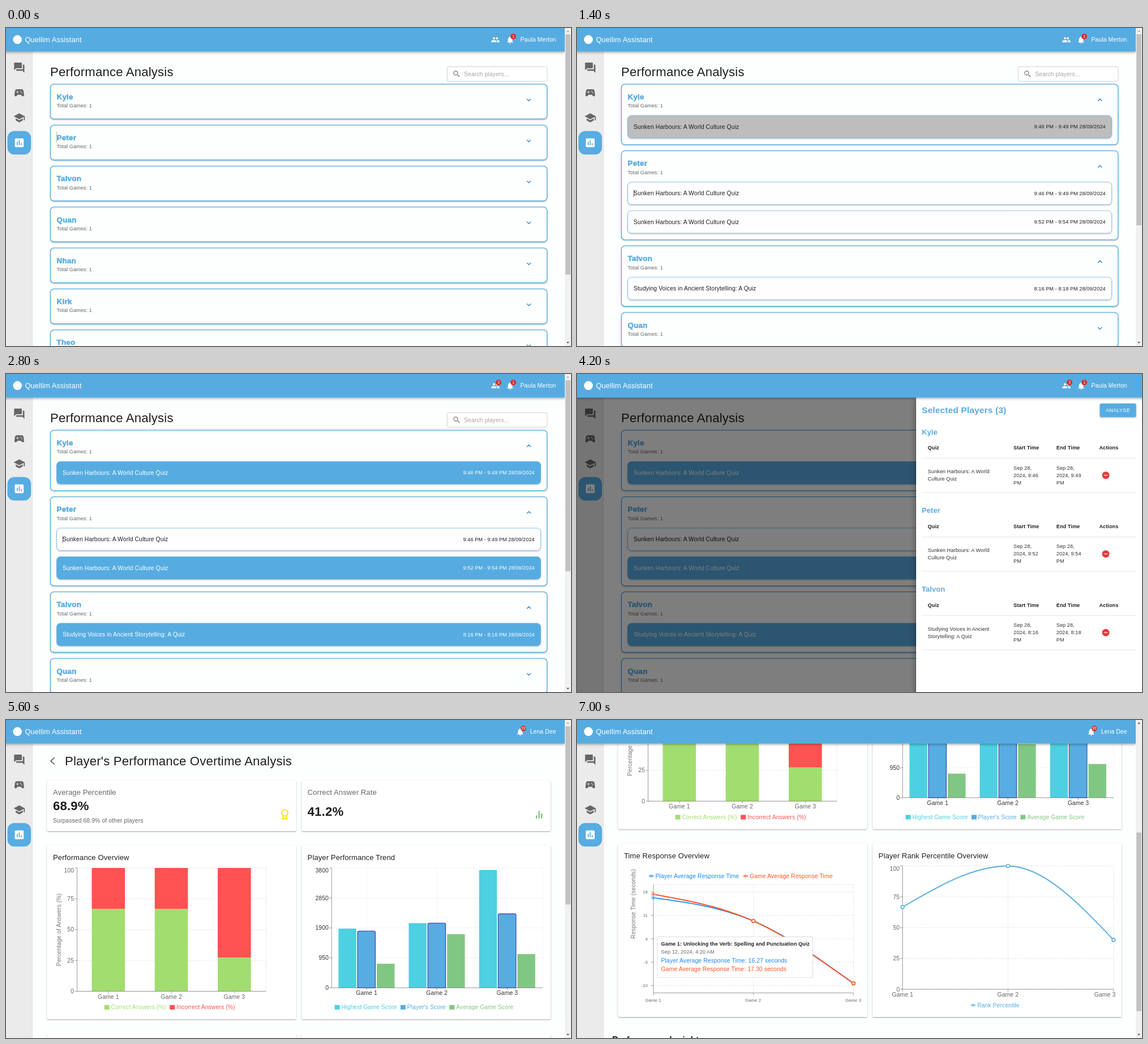
Recreate the animation shown at these times as an HTML page. Size 998 by 561 pixels, loop 8000 ms.

```html
<!DOCTYPE html>
<html lang="en">
<head>
<meta charset="utf-8">
<title>Performance Analysis</title>
<style>
  html, body { margin: 0; width: 100%; height: 100%; overflow: hidden; background: #fdfefe; }
  svg { display: block; width: 998px; height: 561px; }
  text { font-family: "Liberation Sans", Arial, sans-serif; letter-spacing: .009em; white-space: pre; }
</style>
</head>
<body>
<svg id="stage" viewBox="0 0 998 561" xmlns="http://www.w3.org/2000/svg">
  <defs>
    <filter id="bar" x="-5%" y="-20%" width="110%" height="160%"><feDropShadow dx="0" dy="1.6" stdDeviation="1.9" flood-opacity=".34"/></filter>
    <filter id="card" x="-2%" y="-10%" width="104%" height="125%"><feDropShadow dx="0" dy=".9" stdDeviation=".8" flood-opacity=".3"/></filter>
    <filter id="paper" x="-3%" y="-8%" width="106%" height="118%"><feDropShadow dx="0" dy="1" stdDeviation="1.3" flood-opacity=".38"/></filter>
    <filter id="side" x="-10%" y="-5%" width="120%" height="110%"><feDropShadow dx="-1" dy="3" stdDeviation="5" flood-opacity=".4"/></filter>
  </defs>
  <g id="view"></g>
</svg>
<script>
const BLUE = "#57ace1", INK = "#1f1f1f", GREY = "#666", LINK = "#1976d2";
const S = { xs: 7.8, sm: 9.1, md: 10.4, lg: 13, xl: 15.6, h: 22.1 };

const ICON = {
  forum: "M21 6h-2v9H6v2c0 .55.45 1 1 1h11l4 4V7c0-.55-.45-1-1-1zm-4 6V3c0-.55-.45-1-1-1H3c-.55 0-1 .45-1 1v14l4-4h10c.55 0 1-.45 1-1z",
  pad: "M21.58 16.09l-1.09-7.66C20.21 6.46 18.52 5 16.53 5H7.47C5.48 5 3.79 6.46 3.51 8.43l-1.09 7.66C2.2 17.63 3.39 19 4.94 19c.68 0 1.32-.27 1.8-.75L9 16h6l2.25 2.25c.48.48 1.13.75 1.8.75 1.56 0 2.75-1.37 2.53-2.91zM11 11H9v2H8v-2H6v-1h2V8h1v2h2v1zm4-1a1 1 0 1 1 0-2 1 1 0 0 1 0 2zm2 3a1 1 0 1 1 0-2 1 1 0 0 1 0 2z",
  school: "M5 13.18v4L12 21l7-3.82v-4L12 17l-7-3.82zM12 3L1 9l11 6 9-4.91V17h2V9L12 3z",
  chart: "M19 3H5c-1.1 0-2 .9-2 2v14c0 1.1.9 2 2 2h14c1.1 0 2-.9 2-2V5c0-1.1-.9-2-2-2zM9 17H7v-7h2v7zm4 0h-2V7h2v10zm4 0h-2v-4h2v4z",
  people: "M16 11a3 3 0 1 0 0-6 3 3 0 0 0 0 6zm-8 0a3 3 0 1 0 0-6 3 3 0 0 0 0 6zm0 2c-2.33 0-7 1.17-7 3.5V19h14v-2.5c0-2.33-4.67-3.5-7-3.5zm8 0c-.29 0-.62.02-.97.05 1.16.84 1.97 1.97 1.97 3.45V19h6v-2.5c0-2.33-4.67-3.5-7-3.5z",
  bell: "M12 22c1.1 0 2-.9 2-2h-4c0 1.1.89 2 2 2zm6-6v-5c0-3.07-1.64-5.64-4.5-6.32V4a1.5 1.5 0 0 0-3 0v.68C7.63 5.36 6 7.92 6 11v5l-2 2v1h16v-1l-2-2z",
  search: "M15.5 14h-.79l-.28-.27A6.5 6.5 0 1 0 13.73 14.43l.27.28v.79l5 4.99L20.49 19l-4.99-5zm-6 0a4.5 4.5 0 1 1 0-9 4.5 4.5 0 0 1 0 9z",
  more: "M16.59 8.59 12 13.17 7.41 8.59 6 10l6 6 6-6z",
  less: "m12 8-6 6 1.41 1.41L12 10.83l4.59 4.58L18 14z",
  remove: "M12 2a10 10 0 1 0 0 20 10 10 0 0 0 0-20zm5 11H7v-2h10v2z"
};

// Drawing helpers
const text = (x, y, s, size, fill = INK, more = "") =>
  `<text x="${x}" y="${y}" font-size="${size}" fill="${fill}" ${more}>${s}</text>`;
const MID = 'text-anchor="middle"', END = 'text-anchor="end"', BOLD = 'font-weight="700"';
const rect = (x, y, w, h, fill, more = "") =>
  `<rect x="${x}" y="${y}" width="${w}" height="${h}" fill="${fill}" ${more}/>`;
const line = (x1, y1, x2, y2, stroke, more = "") =>
  `<path d="M${x1} ${y1}L${x2} ${y2}" stroke="${stroke}" stroke-width=".65" fill="none" ${more}/>`;
const dash = (x1, y1, x2, y2, c = "#ccc") => line(x1, y1, x2, y2, c, 'stroke-dasharray="1.95 1.95"');
const circle = (x, y, r, fill, more = "") => `<circle cx="${x}" cy="${y}" r="${r}" fill="${fill}" ${more}/>`;
const place = (x, y, k, body, more = "") =>
  `<g transform="translate(${x} ${y}) scale(${k}) translate(-12 -12)" ${more}>${body}</g>`;
const icon = (name, x, y, fill, k = .65) => place(x, y, k, `<path d="${ICON[name]}" fill="${fill}"/>`);
const shift = (dy, body) => `<g transform="translate(0 ${dy})">${body}</g>`;
const vertical = (x, y, s) => text(0, 0, s, S.md, "#777", `${MID} transform="translate(${x} ${y}) rotate(-90)"`);

// Shared frame of the app
function badge(x, n) {
  return circle(x, 15, 5, "#d32f2f") + text(x, 17.3, n, 6.6, "#fff", MID);
}

function header(user, bellX, bellCount, people, width = 987) {
  let s = rect(-6, -10, width + 6, 51.6, BLUE, 'filter="url(#bar)"')
    + circle(20.2, 20.4, 7.8, "#fff")
    + text(33.5, 25.3, "Quellim Assistant", 12.8, "#fff")
    + icon("bell", bellX, 21, "#fff") + badge(bellX + 5.5, bellCount)
    + text(971.5, 24.4, user, S.md, "#fff", END);
  if (people != null) s += icon("people", 864.5, 20.7, "#fff");
  if (people) s += badge(870, people);
  return s;
}

function sidebar() {
  return rect(0, 41, 46.3, 520, "#ebebeb") + line(46.5, 41, 46.5, 561, "#d2d2d2")
    + icon("forum", 23.4, 70, GREY, .91) + icon("pad", 23.4, 114.3, GREY, .89)
    + icon("school", 23.4, 158.4, GREY, .89)
    + rect(2.6, 181.7, 41.5, 41.5, BLUE, 'rx="12"') + icon("chart", 23.4, 202.5, "#fff", .87);
}

function scrollbar(top, bottom) {
  const atTop = top < 12;
  return rect(987, 0, 11, 561, "#f1f1f1") + rect(988.2, top, 8.7, bottom - top, "#c1c1c1")
    + `<path d="M990 6.8h5l-2.5-2.8z" fill="${atTop ? "#a3a3a3" : "#505050"}"/>`
    + '<path d="M990 553.8h5l-2.5 2.8z" fill="#505050"/>';
}

// Player list
const HARBOURS = "Sunken Harbours: A World Culture Quiz";
const VOICES = "Studying Voices in Ancient Storytelling: A Quiz";
const players = [
  ["Kyle", [[HARBOURS, "9:46 PM - 9:49 PM"]]],
  ["Peter", [[HARBOURS, "9:46 PM - 9:49 PM"], [HARBOURS, "9:52 PM - 9:54 PM"]]],
  ["Talvon", [[VOICES, "8:16 PM - 8:18 PM"]]],
  ["Quan"], ["Nhan"], ["Kirk"], ["Theo"]
];
const itemFill = { plain: "#fefefe", hover: "#bdbdbd", picked: BLUE };

function quizRow(y, [title, time], state) {
  const ink = state === "picked" ? "#fff" : INK;
  return rect(89.6, y, 854.8, 39.6, itemFill[state], `rx="6.5" stroke="${BLUE}" stroke-width=".65" filter="url(#card)"`)
    + text(100, y + 23.3, title, S.md, ink)
    + text(933.7, y + 22.8, time + " 28/09/2024", S.sm, ink, END);
}

function playerList(states) {
  let y = 99.1, row = 0;
  let s = text(78, 84.6, "Performance Analysis", S.h)
    + rect(779.3, 68.2, 176.6, 25.8, "#fff", 'rx="2.6" stroke="#c4c4c4" stroke-width=".8"')
    + icon("search", 796, 81, "#757575") + text(809, 84.7, "Search players...", S.md, "#a6a6a6");
  for (const [name, games = []] of players) {
    const open = states && games.length > 0;
    const h = open ? 56.2 + 50.4 * games.length : 61.4;
    s += rect(78.5, y, 877.2, h, "#fdfefe", `rx="6.2" stroke="${BLUE}" stroke-width="1.3" filter="url(#card)"`)
      + text(89.5, y + 26.7, name, 13.3, BLUE, `${BOLD} stroke="${BLUE}" stroke-width=".5" style="letter-spacing:.3px"`)
      + text(89.5, y + 41.1, "Total Games: 1", S.sm, GREY)
      + icon(open ? "less" : "more", 923.6, y + 27.8, LINK);
    if (open) games.forEach((g, i) => { s += quizRow(y + 55.4 + 50.4 * i, g, states[row++]); });
    y += h + 10.85;
  }
  return s;
}

const picked = ["picked", "plain", "picked", "picked"];
const listPage = (states, end, people, caret) => sidebar() + playerList(states) + caret
  + header("Paula Merton", 890.5, 1, people) + scrollbar(11, end);

// Selection drawer
function drawer() {
  const cols = [619.6, 771, 846.8, 922.4];
  const picks = [
    ["Kyle", ["Sunken Harbours: A World", "Culture Quiz"], "9:46", "9:49"],
    ["Peter", ["Sunken Harbours: A World", "Culture Quiz"], "9:52", "9:54"],
    ["Talvon", ["Studying Voices in Ancient", "Storytelling: A Quiz"], "8:16", "8:18"]
  ];
  const lines = (x, y, rows) => rows.map((r, i) => text(x, y + 13 * i, r, S.sm, "#333")).join("");
  const date = t => ["Sep 28,", `2024, ${t}`, "PM"];
  let s = rect(599, 41, 410, 530, "#fff", 'filter="url(#side)"')
    + text(609, 69.2, "Selected Players (3)", 15.5, BLUE, BOLD)
    + rect(923.5, 52, 64, 23.8, BLUE, 'rx="2.6" filter="url(#paper)"')
    + text(955.5, 67.1, "ANALYSE", S.sm, "#fff", `${MID} style="letter-spacing:.026em"`);
  picks.forEach(([name, quiz, from, to], i) => {
    const y = 138.75 * i;
    s += text(609, y + 106.5, name, 12.9, BLUE, BOLD);
    ["Quiz", "Start Time", "End Time", "Actions"].forEach((c, j) => {
      s += text(cols[j], y + 133.3, c, S.sm, INK, BOLD);
    });
    s += line(609, y + 148.6, 988, y + 148.6, "#dcdcdc") + line(609, y + 209.2, 988, y + 209.2, "#dcdcdc")
      + lines(cols[0], y + 175, quiz) + lines(cols[1], y + 168.6, date(from)) + lines(cols[2], y + 168.6, date(to))
      + icon("remove", 934, y + 178.7, "#e8383d");
  });
  return s;
}

const drawerPage = () => sidebar() + playerList(picked) + rect(0, 41, 998, 520, "#000", 'opacity=".5"')
  + drawer() + header("Paula Merton", 890.5, 1, 3, 1010);

// Charts
const paper = (x, y, h) => rect(x, y, 439.8, h, "#fff", 'rx="2.6" filter="url(#paper)"');

// Axes with tick labels; the topmost label may be nudged down.
function axes(x0, x1, y0, y1, ticks, xs, o) {
  let s = "";
  for (const [y] of ticks) s += dash(x0, y, x1, y, o.grid);
  for (const x of [...xs, x1]) s += dash(x, y0, x, y1, o.grid);
  if (o.top) s += dash(x0, y0, x1, y0, o.grid);
  s += o.marks || "";
  s += line(x0, y0, x0, y1, GREY) + line(x0, y1, x1, y1, GREY);
  ticks.forEach(([y, label], i) => {
    const nudge = i === 0 ? o.nudge || 0 : 0;
    s += line(x0 - 4, y, x0, y, GREY) + text(x0 - o.gap, y + o.size * .35 + nudge, label, o.size, o.ink, END);
  });
  (o.names || xs).forEach((x, i) => {
    s += line(xs[i] ?? x1, y1, xs[i] ?? x1, y1 + 4, GREY)
      + text(x, y1 + o.drop, `Game ${i + 1}`, o.size, o.ink, MID);
  });
  return s;
}

const scale = (top, bottom, labels) => labels.map((l, i) => [top + (bottom - top) * i / (labels.length - 1), l]);
const key = (x, s, c) => rect(x, 502.8, 9, 8, c) + text(x + 11.8, 510.2, s, S.md, c);
const lineKey = (x, y, s, c) => `<path d="M${x} ${y}h9" stroke="${c}" stroke-width="1.3"/>`
  + circle(x + 4.5, y, 1.7, "#fff", `stroke="${c}" stroke-width="1.2"`) + text(x + 11.7, y + 3.7, s, S.md, c);

function answerChart() {
  const base = 478.6, xs = [180.8, 292, 403.3];
  const marks = [66.7, 66.7, 27.3].map((p, i) => {
    const top = base - 2.176 * p, x = xs[i] - 29.3;
    return rect(x, 261, 58.6, top - 261, "#ff5252") + rect(x, top, 58.6, base - top, "#a2dd70");
  }).join("");
  return axes(125.5, 459.2, 261, base, scale(261, base, [100, 75, 50, 25, 0]), xs,
    { marks, size: S.md, ink: GREY, gap: 5.4, drop: 12.9, nudge: 4.6 })
    + vertical(97, 370, "Percentage of Answers (%)")
    + key(173.6, "Correct Answers (%)", "#a2dd70") + key(289.2, "Incorrect Answers (%)", "#ff5252");
}

function scoreChart() {
  const base = 472.5, xs = [637, 761.1, 885.4];
  const tops = [[368, 372.3, 430], [358.4, 358.3, 377.8], [264.6, 342, 413]];
  const marks = tops.map(([a, b, c], i) => {
    const x = xs[i];
    return rect(x - 49.7, a, 31.4, base - a, "#4dd0e1")
      + `<path d="M${x - 16} ${base}V${b + 2.6}q0-2.6 2.6-2.6h26.2q2.6 0 2.6 2.6V${base}z" fill="${BLUE}" stroke="#3f51b5" stroke-width="1.3"/>`
      + rect(x + 18, c, 31.4, base - c, "#81c784");
  }).join("");
  return axes(575.2, 948, 261, base, scale(261, base, [3800, 2850, 1900, 950, 0]), xs,
    { marks, size: S.md, ink: "#333", gap: 5.2, drop: 12.9, nudge: 4.4, grid: "#dedede" })
    + key(580.5, "Highest Game Score", "#4dd0e1") + key(696.8, "Player's Score", BLUE)
    + key(783.2, "Average Game Score", "#81c784");
}

// Monotone cubic through three points
function curve([[x0, y0], [x1, y1], [x2, y2]], c) {
  const h0 = x1 - x0, h1 = x2 - x1, a = (y1 - y0) / h0, b = (y2 - y1) / h1;
  const p = (a * h1 + b * h0) / (h0 + h1);
  const m = (Math.sign(a) + Math.sign(b)) * Math.min(Math.abs(a), Math.abs(b), Math.abs(p) / 2);
  const m0 = (3 * a - m) / 2, m2 = (3 * b - m) / 2;
  const d = `M${x0} ${y0}C${x0 + h0 / 3} ${y0 + m0 * h0 / 3} ${x1 - h0 / 3} ${y1 - m * h0 / 3} ${x1} ${y1}`
    + `C${x1 + h1 / 3} ${y1 + m * h1 / 3} ${x2 - h1 / 3} ${y2 - m2 * h1 / 3} ${x2} ${y2}`;
  return `<path d="${d}" fill="none" stroke="${c}" stroke-width="1.9"/>`;
}
const dots = (pts, c) => pts.map(([x, y]) => circle(x, y, 2.9, "#fff", `stroke="${c}" stroke-width="1.5"`)).join("");
const activeDot = (y, c) => circle(135, y, 2.6, c, 'stroke="#fff" stroke-width="1.1"');

function responseChart() {
  const mine = "#1e88f0", all = "#ff5722";
  const rest = [[311.6, 354.6], [488.3, 464.6]];
  const a = [[135, 313.6], ...rest], b = [[135, 307.5], ...rest];
  return axes(135, 488.3, 290.6, 481.4, scale(303.5, 468.5, [18, 11, 4, -3, -10]), [311.6],
    { size: S.xs, ink: GREY, gap: 10, drop: 15.6, top: true, names: [] })
    + [135, 311.6, 488.3].map((x, i) => line(x, 481.4, x, 485.4, GREY)
      + text(x - .5, 497, `Game ${i + 1}`, S.xs, GREY, MID)).join("")
    + vertical(103.4, 324.5, "Response Time (seconds)")
    + lineKey(126.8, 275.3, "Player Average Response Time", mine)
    + lineKey(293.2, 275.3, "Game Average Response Time", all)
    + curve(a, mine) + curve(b, all) + dots(a, mine) + dots(b, all)
    + activeDot(313.6, mine) + activeDot(307.5, all)
    + rect(142, 382.5, 274.3, 71.6, "#fff", 'stroke="#ccc" stroke-width=".65"')
    + text(148.6, 398.3, "Game 1: Unlocking the Verb: Spelling and Punctuation Quiz", S.sm, INK, BOLD)
    + text(148.6, 412.2, "Sep 12, 2024, 4:20 AM", S.sm, GREY)
    + text(148.6, 427.6, "Player Average Response Time: 16.27 seconds", S.md, mine)
    + text(148.6, 443.3, "Game Average Response Time: 17.30 seconds", S.md, all);
}

function rankChart() {
  const pts = [[575, 330], [761.3, 257.5], [947.8, 388]];
  return axes(575, 947.8, 257.5, 475, scale(257.5, 475, [100, 75, 50, 25, 0]), [575, 761.3],
    { size: S.md, ink: GREY, gap: 5, drop: 12.9, nudge: 4.6, names: [575, 761.3, 932.5] })
    + curve(pts, BLUE) + dots(pts, BLUE) + lineKey(695.2, 503.1, "Rank Percentile", BLUE);
}

const strokeIcon = (x, c, d) => place(x, 167, .78, `<path d="${d}"/>`,
  `fill="none" stroke="${c}" stroke-width="2" stroke-linecap="round" stroke-linejoin="round"`);

function summary() {
  return '<path d="M85.6 66.3L79 72.2L85.6 78.2" fill="none" stroke="#444" stroke-width="1.4"/>'
    + text(104, 79.6, "Player's Performance Overtime Analysis", S.h)
    + paper(72.6, 106.6, 89.4) + paper(522.2, 106.6, 89.4)
    + text(83, 131.9, "Average Percentile", S.lg, GREY)
    + text(83, 158.6, "68.9%", S.h, INK, BOLD)
    + text(83, 181.4, "Surpassed 68.9% of other players", S.md, GREY)
    + strokeIcon(492.4, "#ffd600", "M12 1a7 7 0 1 0 0 14 7 7 0 0 0 0-14zM8.21 13.89L7 23l5-3 5 3-1.21-9.12")
    + text(532.6, 131.9, "Correct Answer Rate", S.lg, GREY)
    + text(532.6, 169, "41.2%", S.h, INK, BOLD)
    + strokeIcon(941.6, "#4caf50", "M18 20V10M12 20V4M6 20V14")
    + paper(72.6, 222, 305.8) + paper(522.2, 222, 305.8)
    + text(83, 247.2, "Performance Overview", S.lg) + text(532.6, 247.2, "Player Performance Trend", S.lg)
    + answerChart() + scoreChart();
}

function details() {
  return paper(72.6, 218.3, 305.8) + paper(522.2, 218.3, 305.8)
    + text(83, 243.6, "Time Response Overview", S.lg) + text(532.6, 243.6, "Player Rank Percentile Overview", S.lg)
    + responseChart() + rankChart()
    + text(62, 569.6, "Performance Insights", S.xl, INK, BOLD);
}

const SCROLL = 335.4;
const reportPage = (scroll, top, bottom) => shift(-scroll, summary()) + shift(SCROLL - scroll, details())
  + sidebar() + header("Lena Dee", 908.3, 39) + scrollbar(top, bottom);

// Timeline
const caret = line(100.4, 285.5, 100.4, 298, "#111");
const scenes = [
  [0, listPage(null, 435, 0, line(89.7, 183, 89.7, 202, "#888"))],
  [1400, listPage(["hover", "plain", "plain", "plain"], 348, 0, caret)],
  [2800, listPage(picked, 348, 3, caret)],
  [4200, drawerPage()],
  [5600, reportPage(0, 11, 325.5)],
  [7000, reportPage(SCROLL, 198.5, 513.5)]
];
const LOOP = 8000, view = document.getElementById("view");
let shown = null;

function render(ms) {
  const t = ms % LOOP;
  const scene = scenes.filter(([start]) => start <= t).pop();
  if (scene !== shown) {
    shown = scene;
    view.innerHTML = scene[1];
  }
}

function tick() {
  render(performance.now());
  requestAnimationFrame(tick);
}
tick();
</script>
</body>
</html>
```
